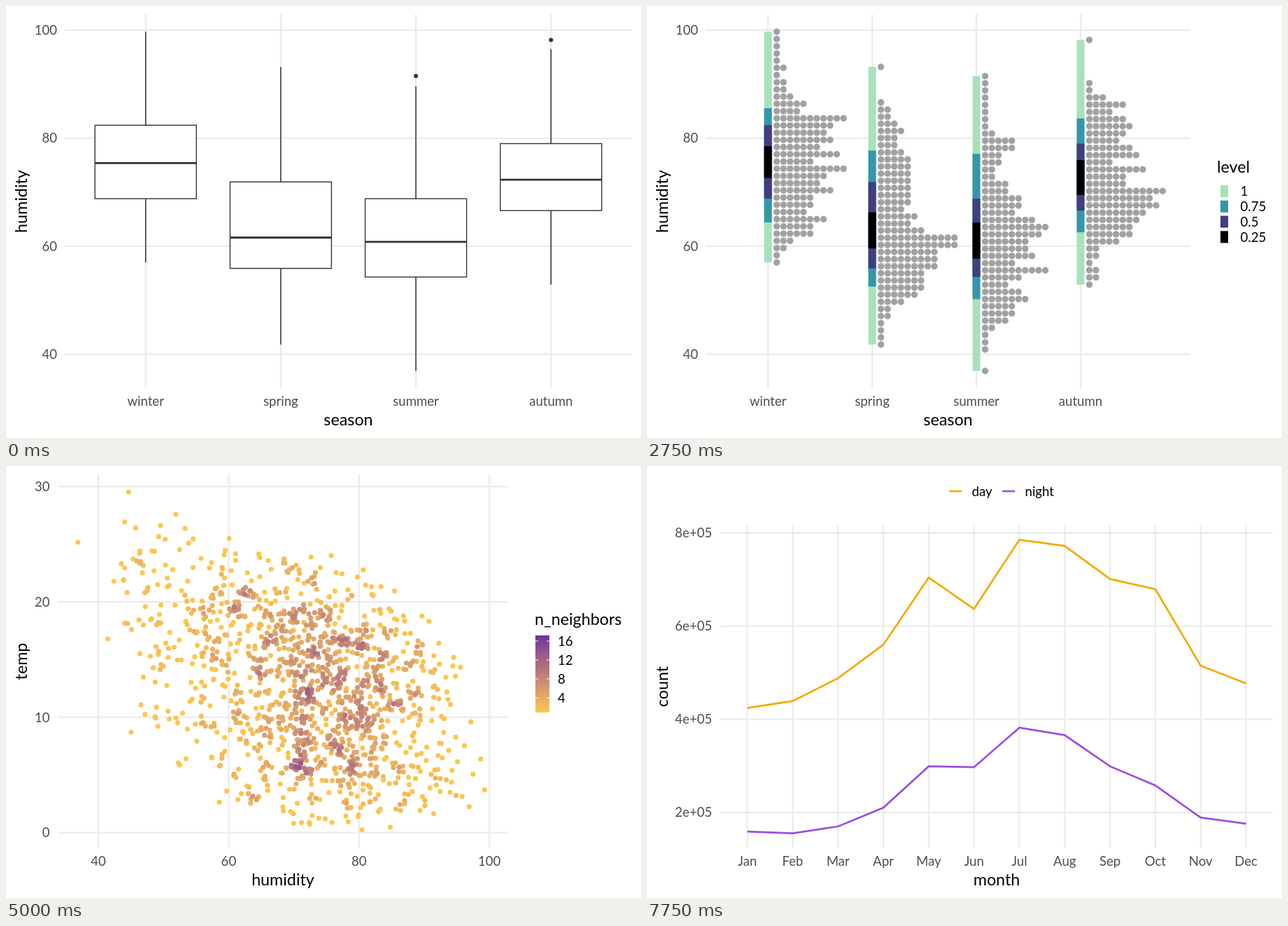
These frames come from a looping animation (908x617 px, 8000 ms). An HTML page:

```html
<!DOCTYPE html>
<html lang="en">
<head>
<meta charset="utf-8">
<title>Season plots</title>
<style>
  html, body { margin: 0; width: 100%; height: 100%; overflow: hidden; background: #fff; }
  svg { display: block; width: 908px; height: 617px; font-family: Lato, "Open Sans", sans-serif; }
</style>
</head>
<body>
<svg viewBox="0 0 908 617">
  <defs id="defs"></defs>
  <g id="stage"></g>
</svg>
<script>
const BEAT = 250;
const BOTTOM = 546;
const GREY = '#a6a6a6';
const DAY = '#f2ab00';
const NIGHT = '#9a4fe3';
const RAMP = [[253, 199, 80], [222, 163, 106], [190, 124, 122], [152, 90, 140], [104, 54, 153]];

// Humidity by season. five: min, quartiles, max; bells: mean, deviation and height of each bump
const seasons = [
  { name: 'winter', five: [57, 68.8, 75.4, 82.4, 99.7],
    bells: [[98.5, 2.2, 11], [89.8, 3, 43], [82.9, 2, 118], [74.3, 4.3, 152], [63.6, 3, 88]] },
  { name: 'spring', five: [41.8, 55.9, 61.6, 71.9, 93.2],
    bells: [[92, 2.5, 6], [79.8, 4, 54], [74.2, 2.4, 48], [67, 4.3, 66], [61.3, 2.1, 80], [55.5, 4.6, 116], [43.5, 2.4, 18]] },
  { name: 'summer', five: [36.9, 54.3, 60.8, 68.8, 91.5], whisker: 89.6,
    bells: [[88.5, 3, 14], [79.6, 2.9, 52], [69.5, 5, 48], [59.5, 5.5, 126], [50, 4, 64], [37.5, 2, 6]] },
  { name: 'autumn', five: [52.9, 66.6, 72.3, 79, 98.2], whisker: 96.5,
    bells: [[98, 2.5, 8], [84, 3, 88], [77, 3.2, 100], [69.3, 3.1, 144], [62.6, 2.2, 74], [56.5, 3.5, 26]] }
];

// ---- helpers ----
const range = (n, f) => Array.from({ length: n }, (_, i) => f(i));
const pairs = flat => range(flat.length / 2, i => [flat[2 * i], flat[2 * i + 1]]);
const path = pts => 'M' + pts.map(p => p[0].toFixed(1) + ' ' + p[1].toFixed(1)).join('L');
const line = (x1, y1, x2, y2, stroke, w) => `<path d="M${x1} ${y1}L${x2} ${y2}" stroke="${stroke}" stroke-width="${w}"/>`;
const rect = (x, y, w, h, fill, more = '') => `<rect x="${x}" y="${y}" width="${w}" height="${h}" fill="${fill}" ${more}/>`;
const dot = (x, y, r, fill) => `<circle cx="${x.toFixed(1)}" cy="${y.toFixed(1)}" r="${r}" fill="${fill}"/>`;
const text = (x, y, s, anchor = 'start', size = 18.6, fill = '#4d4d4d', more = '') =>
  `<text x="${x}" y="${y}" text-anchor="${anchor}" font-size="${size}" fill="${fill}" ${more}>${s}</text>`;
const title = (x, y, s, anchor = 'middle', more = '') => text(x, y, s, anchor, 23.3, '#000', more);
const label = (x, y, s) => text(x, y + 6.6, s, 'start', 18.6, '#000');

// Closed Catmull-Rom spline as a dense polyline
function smooth(pts, steps = 10) {
  const n = pts.length;
  return pts.flatMap((b, i) => {
    const a = pts[(i + n - 1) % n], c = pts[(i + 1) % n], d = pts[(i + 2) % n];
    return range(steps, k => {
      const t = k / steps;
      return [0, 1].map(j => b[j] + t / 2 * (c[j] - a[j] +
        t * (2 * a[j] - 5 * b[j] + 4 * c[j] - d[j] + t * (3 * (b[j] - c[j]) + d[j] - a[j]))));
    });
  });
}

function inside(x, y, poly) {
  let hit = false;
  for (let i = 0, j = poly.length - 1; i < poly.length; j = i++) {
    const [ax, ay] = poly[i], [bx, by] = poly[j];
    if (ay > y !== by > y && x < (bx - ax) * (y - ay) / (by - ay) + ax) hit = !hit;
  }
  return hit;
}

let seed = 20;
function random() {
  seed = seed + 0x6D2B79F5 | 0;
  let t = Math.imul(seed ^ seed >>> 15, 1 | seed);
  t = t + Math.imul(t ^ t >>> 7, 61 | t) ^ t;
  return ((t ^ t >>> 14) >>> 0) / 4294967296;
}
const gauss = () => random() + random() + random() + random() - 2;

function ramp(t) {
  const f = Math.max(0, Math.min(0.999, t)) * (RAMP.length - 1), i = Math.floor(f);
  return `rgb(${RAMP[i].map((v, k) => Math.round(v + (RAMP[i + 1][k] - v) * (f - i)))})`;
}

// Grid, tick labels and axis titles; xs and ys hold [position, label]
function axes({ left, right, top = 12, xs, ys, x, y, gap = 11 }) {
  return xs.map(([p, s]) => line(p, top, p, BOTTOM, '#ebebeb', 2.3) + text(p, 571, s, 'middle')).join('') +
    ys.map(([p, s]) => line(left, p, right, p, '#ebebeb', 2.3) + text(left - gap, p + 6.6, s, 'end')).join('') +
    title((left + right) / 2, 599, x) +
    title(0, 0, y, 'middle', `transform="translate(30 ${(top + BOTTOM) / 2}) rotate(-90)"`);
}

// ---- distribution by season ----
const yOf = h => 34.5 + (100 - h) * 7.715;

// Sum of bells, each blurred by a further variance
const density = (s, h, blur = 0) => s.bells.reduce((sum, [mean, sd, peak]) => {
  const v = sd * sd + blur;
  return sum + peak * sd / Math.sqrt(v) * Math.exp(-((h - mean) ** 2) / (2 * v));
}, 0);

function quantile(s, p) {
  const [min, , , , max] = s.five, n = 400;
  const hs = range(n, i => min + (max - min) * (i + 0.5) / n);
  let left = p * hs.reduce((sum, h) => sum + density(s, h), 0);
  return hs.find(h => (left -= density(s, h)) <= 0);
}

function outline(s, x, k) {
  const [min, , , , max] = s.five, n = 100;
  return range(n + 1, i => {
    const h = max - (max - min) * i / n;
    return [x + density(s, h) * k, yOf(h)];
  });
}

const boxOf = half => (s, x) => {
  const [low, q1, mid, q3, high] = s.five.map(yOf);
  return line(x, s.whisker ? yOf(s.whisker) : high, x, low, '#333', 1.5) +
    rect(x - half, q3, half * 2, q1 - q3, '#fff', 'stroke="#333" stroke-width="1.4"') +
    line(x - half, mid, x + half, mid, '#333', 2.8) +
    (s.whisker ? dot(x, high, 3, '#333') : '');
};
const violin = (s, x) =>
  `<path d="${path(outline(s, x, 0.5).concat(outline(s, x, -0.5).reverse()))}Z" fill="#fff" stroke="#333" stroke-width="1.4"/>`;
const half = (s, x) => `<path d="${path(outline(s, x, 1).concat(outline(s, x, 0).reverse()))}Z" fill="${GREY}"/>`;
const spine = (s, x) => line(x, yOf(s.five[4]), x, yOf(s.five[0]), '#000', 2);
const diamond = (s, x) =>
  `<path d="M${x} ${yOf(s.five[2]) - 10}l10 10l-10 10l-10 -10z" fill="${GREY}" stroke="#000" stroke-width="1.3"/>`;

const levels = [['1', '#a8e1bc'], ['0.75', '#3497a9'], ['0.5', '#413d7f'], ['0.25', '#000']];
const bars = (s, x) => {
  const [min, q1, , q3, max] = s.five;
  const spans = [[min, max], [quantile(s, 0.125), quantile(s, 0.875)], [q1, q3], [quantile(s, 0.375), quantile(s, 0.625)]];
  return spans.map(([a, b], i) => rect(x - 5.5, yOf(b), 11, yOf(a) - yOf(b), levels[i][1])).join('');
};
const rows = (s, x) => {
  const [min, , , , max] = s.five, n = Math.round((max - min) / 1.33);
  return range(n + 1, i => {
    const h = max - (max - min) * i / n;
    const count = Math.round(density(s, h) / 16.5 * (0.6 + 0.85 * random()));
    return range(i % n ? count : 1, k => dot(x + 12.5 + k * 9.55, yOf(h), 4.7, '#a1a1a1')).join('');
  }).join('');
};
const levelKey = title(815, 238, 'level', 'start') + levels.map(([s, fill], i) =>
  rect(820, 256 + i * 21.8, 11, 17, fill) + label(848.5, 264.5 + i * 21.8, s)).join('');

const seasonal = (x0, step, right, key = '') => (...layers) =>
  axes({
    left: 84, right, x: 'season', y: 'humidity',
    xs: seasons.map((s, i) => [x0 + i * step, s.name]),
    ys: [100, 80, 60, 40].map(h => [yOf(h), h])
  }) + seasons.map((s, i) => layers.map(f => f(s, x0 + i * step)).join('')).join('') + key;
const centred = seasonal(199.7, 193.2, 895);
const shifted = seasonal(189.7, 176.4, 895);
const keyed = seasonal(173, 149, 777, levelKey);

// ---- ridges: the same densities, blurred ----
function ridges(fill) {
  const base = i => 483.5 - i * 104.5;
  const xOf = h => 263.5 + (h - 40) * 8.625;
  const shapes = seasons.map((s, i) => {
    const top = path(range(165, k => {
      const h = 27.4 + k / 2;
      return [xOf(h), base(i) - 1.15 * density(s, h, 7)];
    }));
    return `<path d="${top}Z" fill="${fill}"/><path d="${top}" fill="none" stroke="#fff" stroke-width="1.6"/>`;
  });
  return axes({
    left: 121, right: 895, gap: 13, x: 'humidity', y: 'season',
    xs: [40, 60, 80, 100].map(h => [xOf(h), h]),
    ys: seasons.map((s, i) => [base(i), s.name])
  }) + shapes.reverse().join('');
}

// ---- humidity and temperature ----
const probs = [['50%', 1, 0.5], ['80%', 0.66, 0.8], ['95%', 0.4, 0.96], ['99%', 0.1, 1]];

// The 95% ring lies between the 80% and 99% rings
function ringSet(core, inner, outer) {
  const a = pairs(inner), b = pairs(outer);
  const between = a.map((p, i) => p.map((v, j) => v + (b[i][j] - v) * 0.58));
  return [pairs(core), a, between, b].map(pts => smooth(pts));
}
const dayRings = ringSet(
  [279, 218, 300, 180, 352, 174, 404, 190, 418, 236, 460, 250, 540, 254, 578, 300, 588, 372, 510, 410,
    455, 443, 350, 404, 333, 364, 371, 326, 345, 289, 290, 263],
  [217, 200, 255, 154, 358, 137, 478, 208, 560, 217, 632, 340, 605, 412, 470, 475, 330, 435, 262, 345, 228, 280],
  [120, 128, 205, 60, 400, 92, 530, 150, 660, 215, 735, 400, 640, 492, 480, 510, 330, 492, 160, 355, 140, 245]);
const nightRings = ringSet(
  [389, 225, 432, 201, 515, 228, 585, 287, 606, 385, 500, 447, 432, 420, 442, 345, 434, 295, 447, 255, 410, 240],
  [327, 232, 365, 190, 440, 169, 555, 218, 648, 310, 650, 388, 560, 489, 455, 464, 380, 375, 358, 268],
  [235, 215, 305, 115, 440, 109, 580, 157, 695, 290, 737, 460, 620, 518, 403, 518, 290, 360, 250, 270]);

// Fill each ring with its share of the points; some points huddle around earlier ones
function scatter(rings, n) {
  const pts = [];
  while (pts.length < n) {
    const u = random(), k = probs.findIndex(p => u < p[2]);
    const near = k < 2 && pts.length && random() < 0.35 && pts[Math.floor(random() * pts.length)];
    for (let tries = 0; tries < 500; tries++) {
      const [x, y] = near ? [near[0] + gauss() * 16, near[1] + gauss() * 16] : [100 + random() * 642, 36 + random() * 485];
      if (inside(x, y, rings[k]) && !(k && inside(x, y, rings[k - 1]))) { pts.push([x, y]); break; }
      if (near && tries > 8) break;
    }
  }
  return pts;
}
const dayPts = scatter(dayRings, 670).concat([[105, 109], [183, 37], [256, 69]]);
const nightPts = scatter(nightRings, 670);
const allPts = dayPts.concat(nightPts);
const counted = allPts.map(([x, y]) =>
  [x, y, allPts.filter(q => Math.hypot(q[0] - x, q[1] - y) < 10.5).length - 1]).sort((a, b) => a[2] - b[2]);

const tempAxes = (right, x0, step) => axes({
  left: 74, right, x: 'humidity', y: 'temp', gap: 11.5,
  xs: [40, 60, 80, 100].map((v, i) => [x0 + i * step, v]),
  ys: [30, 20, 10, 0].map((v, i) => [29.3 + i * 164.8, v])
});

function neighbours(coloured) {
  const key = title(756, 227, 'n_neighbors', 'start') + rect(757, 242, 20, 110, 'url(#bar)') +
    [16, 12, 8, 4].map((v, i) => {
      const y = 250 + i * 27;
      return line(757, y, 761, y, '#fff', 1) + line(773, y, 777, y, '#fff', 1) + label(789, y, v);
    }).join('');
  return tempAxes(718, 132, 186.4) + counted.map(([x, y, n]) =>
    dot(132 + (x - 136.5) * 0.9274, y, 3.6, ramp(coloured ? (n - 0.8) / 16 : 0))).join('') + key;
}

function groups(depth, points = true) {
  const cloud = (pts, fill) => `<g fill-opacity=".2">${pts.map(p => dot(p[0], p[1], 3, fill)).join('')}</g>`;
  const rings = (list, stroke) => list.slice(0, depth).map((pts, i) =>
    `<path d="${path(pts)}Z" fill="none" stroke="${stroke}" stroke-width="2.6" opacity="${probs[i][1]}"/>`).reverse().join('');
  const key = [['day', DAY], ['night', NIGHT]].map(([s, c], i) =>
    line(808, 188 + i * 22, 826, 188 + i * 22, c, 2.6) + label(840.5, 188 + i * 22, s)).join('') +
    title(807, 291, 'probs', 'start') + probs.map(([s, a], i) => {
      const y = 383 - i * 21.7;
      return `<g stroke-opacity="${a}">${line(808, y, 826, y, '#000', 2.7)}</g>` + label(840.5, y, s);
    }).join('');
  return tempAxes(769, 136.5, 201) +
    (points ? cloud(dayPts, DAY) + cloud(nightPts, NIGHT) : '') +
    rings(dayRings, DAY) + rings(nightRings, NIGHT) + key;
}

// ---- counts by month, in ten thousands ----
function monthly() {
  const xOf = i => 143.5 + i * 64.82, yOf = v => 95.5 + (80 - v) * 6.655;
  const names = 'Jan Feb Mar Apr May Jun Jul Aug Sep Oct Nov Dec'.split(' ');
  const day = [42.4, 43.9, 48.8, 56, 70.4, 63.7, 78.5, 77.2, 70.1, 67.9, 51.5, 47.7];
  const night = [15.9, 15.5, 17, 21, 29.9, 29.7, 38.2, 36.6, 29.9, 25.8, 18.9, 17.6];
  const curve = (values, c) =>
    `<path d="${path(values.map((v, i) => [xOf(i), yOf(v)]))}" fill="none" stroke="${c}" stroke-width="2.7"/>`;
  const key = (x, s, c) => line(x, 36, x + 18, 36, c, 2.7) + label(x + 32.5, 36, s);
  return axes({
    left: 105, right: 895, top: 84, gap: 12, x: 'month', y: 'count',
    xs: names.map((s, i) => [xOf(i), s]),
    ys: [8, 6, 4, 2].map(v => [yOf(v * 10), v + 'e+05'])
  }) + curve(day, DAY) + curve(night, NIGHT) + key(432, 'day', DAY) + key(508, 'night', NIGHT);
}

// ---- slides: beats, picture ----
const slides = [
  [2, centred(boxOf(72.5))],
  [1, centred(violin)],
  [1, centred(violin, boxOf(14))],
  [1, shifted(half)],
  [2, shifted(half, spine)],
  [2, shifted(half, spine, diamond)],
  [1, keyed(half, bars)],
  [1, keyed(bars)],
  [2, keyed(bars, rows)],
  [1, keyed(half, bars)],
  [2, ridges(GREY)],
  [2, ridges('url(#ridge)')],
  [1, neighbours(false)],
  [2, neighbours(true)],
  [1, groups(0)],
  [1, groups(1)],
  [1, groups(2)],
  [1, groups(3)],
  [2, groups(4)],
  [2, groups(4, false)],
  [2, groups(2, false)],
  [1, monthly()]
];
const beats = slides.flatMap(([n, markup]) => Array(n).fill(markup));

const stops = RAMP.map((c, i) => `<stop offset="${i / 4}" stop-color="rgb(${c})"/>`).join('');
document.getElementById('defs').innerHTML =
  `<linearGradient id="ridge" gradientUnits="userSpaceOnUse" x1="190" y1="0" x2="850" y2="0">${stops}</linearGradient>` +
  `<linearGradient id="bar" x1="0" y1="1" x2="0" y2="0">${stops}</linearGradient>`;

const stage = document.getElementById('stage');
let shown = null;
function draw() {
  const markup = beats[Math.floor(performance.now() / BEAT) % beats.length];
  if (markup !== shown) stage.innerHTML = shown = markup;
  requestAnimationFrame(draw);
}
draw();
</script>
</body>
</html>
```
